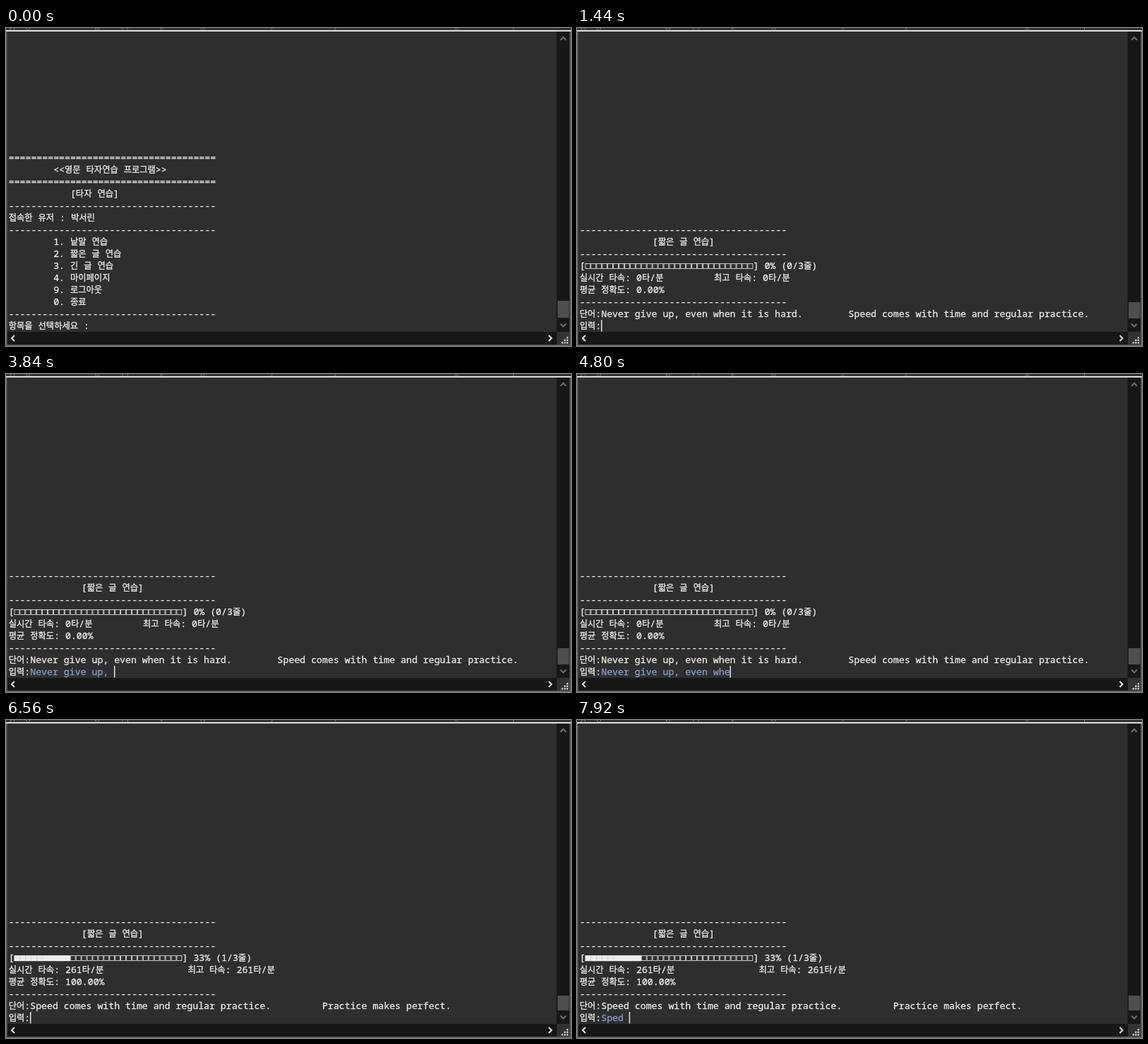
These frames come from a looping animation (800 by 450 pixels, 8 s). An HTML page with a canvas:

```html
<!DOCTYPE html>
<html lang="ko">
<head>
<meta charset="utf-8">
<title>Typing practice console</title>
<style>
html, body { margin: 0; width: 100%; height: 100%; overflow: hidden; background: #2e2e2e; }
canvas { display: block; }
</style>
</head>
<body>
<canvas id="stage" width="800" height="450"></canvas>
<script>
const ctx = document.getElementById('stage').getContext('2d');

const LOOP = 8000;
const LEFT = 3.5, CELL = 7.93, WIDE = 11.3, TAB = CELL * 8;
const ROW = 17, LAST_BASE = 426, KEY_STEP = 80;
const INK = '#ebebeb', INPUT = '#7f9fcf';
const LATIN = '13.2px "Noto Sans Mono", "DejaVu Sans Mono", monospace';
const HANGUL = '12.3px "Noto Sans CJK KR", "Noto Sans CJK", "Noto Sans CJK JP", sans-serif';

const dashes = '-'.repeat(37), equals = '='.repeat(37);

const menu = [
  equals,
  '\t<<영문 타자연습 프로그램>>',
  equals,
  ' '.repeat(11) + '[타자 연습]',
  dashes,
  '접속한 유저 : 박서린',
  dashes,
  '\t1. 낱말 연습',
  '\t2. 짧은 글 연습',
  '\t3. 긴 글 연습',
  '\t4. 마이페이지',
  '\t9. 로그아웃',
  '\t0. 종료',
  dashes,
  '항목을 선택하세요 : '
];

const sentences = [
  'Never give up, even when it is hard.',
  'Speed comes with time and regular practice.',
  'Practice makes perfect.'
];

// Bursts of keys: start time and characters, \b deletes one
const bursts = [
  [[2080, 'Never '], [2640, 'gi'], [2960, 've ', 160], [3440, 'up'], [3680, ', '],
   [4000, 'e'], [4240, 'ven'], [4560, ' when it\b'], [5360, 't '], [5680, 'is'],
   [5920, ' har'], [6320, 'd.']],
  [[7200, 'Sped'], [7760, ' ']]
];

function typedText(list, t) {
  let out = '';
  for (const [start, keys, step = KEY_STEP] of list) {
    [...keys].forEach((key, i) => {
      if (t < start + i * step) return;
      out = key === '\b' ? out.slice(0, -1) : out + key;
    });
  }
  return out;
}

function practice(done, speed, accuracy) {
  const full = done * 10;
  return [
    dashes,
    ' '.repeat(13) + '[짧은 글 연습]',
    dashes,
    `[${'■'.repeat(full)}${'□'.repeat(30 - full)}] ${Math.floor(done * 100 / 3)}% (${done}/3줄)`,
    `실시간 타속: ${speed}타/분\t\t최고 타속: ${speed}타/분`,
    `평균 정확도: ${accuracy}%`,
    dashes,
    `단어:${sentences[done]}\t\t${sentences[done + 1]}`,
    '입력:'
  ];
}

function sceneAt(t) {
  if (t < 1280) {
    return { lines: menu, typed: t < 640 ? '' : '2', caret: t >= 640 && t < 960, thumb: [386, 410] };
  }
  if (t < 1360) {
    return { lines: [...menu, ''], echo: '2', typed: '', caret: true, thumb: [387, 410] };
  }
  const done = t < 6560 ? 0 : 1;
  return {
    lines: done ? practice(1, 261, '100.00') : practice(0, 0, '0.00'),
    typed: typedText(bursts[done], t),
    caret: true,
    thumb: done ? [390, 411] : [388, 411]
  };
}

function rect(x, y, w, h, color) {
  ctx.fillStyle = color;
  ctx.fillRect(x, y, w, h);
}

// Draws one console line and returns the x where it ends
function write(text, x, y, color) {
  ctx.fillStyle = ctx.strokeStyle = color;
  for (const ch of text) {
    if (ch === '\t') {
      x = LEFT + (Math.floor((x - LEFT) / TAB + 0.001) + 1) * TAB;
      continue;
    }
    const wide = ch >= '가' && ch <= '힣';
    if (ch === '■') {
      ctx.fillRect(x, y - 8, CELL + 0.2, 8.2);
    } else if (ch === '□') {
      ctx.lineWidth = 0.8;
      ctx.strokeRect(x + 0.5, y - 7.5, 6.9, 7);
    } else if (ch !== ' ') {
      ctx.font = wide ? HANGUL : LATIN;
      ctx.lineWidth = 0.3;
      ctx.fillText(ch, x + 0.2, y);
      ctx.strokeText(ch, x + 0.2, y);
    }
    x += wide ? WIDE : CELL;
  }
  return x;
}

function chevron(x, y, dx, dy, color) {
  ctx.beginPath();
  ctx.moveTo(x - dx * 2 - dy * 4, y - dy * 2 - dx * 4);
  ctx.lineTo(x + dx * 2, y + dy * 2);
  ctx.lineTo(x - dx * 2 + dy * 4, y - dy * 2 + dx * 4);
  ctx.strokeStyle = color;
  ctx.lineWidth = 2;
  ctx.stroke();
}

function drawTitle() {
  rect(0, 0, 800, 3, '#343434');
  ctx.save();
  ctx.beginPath();
  ctx.rect(0, 0, 800, 2.5);
  ctx.clip();
  ctx.font = '12px "Open Sans", sans-serif';
  ctx.fillStyle = '#8c8c8c';
  const parts = [[4, 'yping'], [125, '[Java Application]'], [241, 'C:\\Program Files'],
    [374, 'y'], [464, 'y'], [534, '/'], [635, '_'], [717, 'p']];
  for (const [x, s] of parts) ctx.fillText(s, x, 0);
  ctx.restore();
  rect(0, 3, 800, 2, '#dedede');
}

function drawFrame([top, bottom]) {
  rect(779.5, 5, 18.5, 425, '#171717');
  rect(2, 430, 778, 18, '#171717');
  rect(780, 430, 18, 18, '#333');
  rect(781, top, 16.5, bottom - top, '#4e4e4e');
  chevron(789, 15, 0, -1, '#6c6c6c');
  chevron(789, 420.5, 0, 1, '#6c6c6c');
  chevron(10, 439, -1, 0, '#e0e0e0');
  chevron(770.5, 439, 1, 0, '#e0e0e0');
  for (let r = 0; r < 3; r++) {
    for (let c = 2 - r; c < 3; c++) rect(786.5 + c * 3.6, 437 + r * 3.6, 2.4, 2.4, '#d0d0d0');
  }
  rect(0, 5, 1.4, 445, '#686868');
  rect(798.4, 5, 1.6, 445, '#626262');
  rect(0, 448.3, 800, 1.7, '#686868');
}

function draw(t) {
  const { lines, typed, echo, caret, thumb } = sceneAt(t);
  rect(0, 0, 800, 450, '#2e2e2e');
  const last = lines.length - 1;
  let x = LEFT;
  lines.forEach((line, i) => {
    const y = LAST_BASE - (last - i) * ROW;
    x = write(line, LEFT, y, INK);
    if (echo && i === last - 1) write(echo, x, y, INPUT);
  });
  x = write(typed, x, LAST_BASE, INPUT);
  if (caret) rect(x, 413, 1.4, 16.5, '#f0f0f0');
  drawFrame(thumb);
  drawTitle();
}

const begin = performance.now();
function tick() {
  draw((performance.now() - begin) % LOOP);
  requestAnimationFrame(tick);
}
tick();
</script>
</body>
</html>
```
